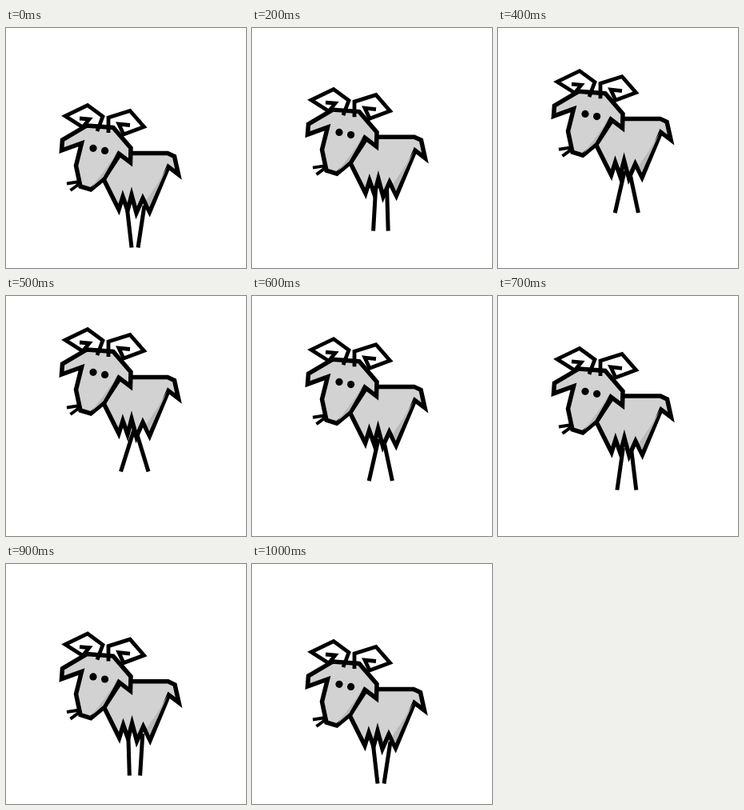
Animation of 300x300 px, one loop 1.5 s. Source, as an HTML page:

```html
<!DOCTYPE html>
<html lang="en">
<head>
<meta charset="utf-8">
<title>Jumping goat</title>
<style>
  html, body { margin: 0; width: 100%; height: 100%; overflow: hidden; background: #fff; }
  svg { display: block; width: 100vw; height: 100vh; }
  path { fill: none; stroke: #000; stroke-miterlimit: 10; }
  .coat { fill: #d2d2d2; stroke-width: 5.5; }
  .shade { fill: #b9b9b9; stroke: none; }
  .horn { stroke-width: 4.8; }
  .leg { stroke-width: 5; }
  .grass { stroke-width: 4; }
</style>
</head>
<body>
<svg viewBox="0 0 300 300">
  <g id="goat">
    <path id="legs" class="leg"/>
    <g id="body">
      <path class="coat" d="M157 156.5H202L210.5 160.5 215.5 183 203 173.5 179.5 230 171 213 163 231 157 209 152 228 146 211 141 227 122 189 141 160Z"/>
      <path class="shade" d="M201.5 174 Q190 195 175.5 215 L179 224Z"/>
    </g>
    <g id="head">
      <path class="coat" d="M101 122 134 124.5 156 150 155.5 168 141 157 123 188 106 202 93 198 87.5 172 94.5 144 69.5 153 70.5 140Z"/>
      <path class="shade" d="M139 156 Q123 179 107 199 L121.5 186.5Z"/>
      <path class="grass" d="M76 194.5 92 192M80.5 203 94 193"/>
      <path class="horn" d="M92 113 104 114 96 124 74 110 102 96.5 121 110.5 114 129"/>
      <path class="horn" d="M128 131V112L155 103.5 172.5 123.5 147 133 141 120 155 121.5"/>
      <circle cx="109" cy="150.3" r="4.6"/>
      <circle cx="123.6" cy="153.4" r="4.6"/>
    </g>
  </g>
</svg>
<script>
const $ = id => document.getElementById(id);
const LOOP = 1500, STEP = 100, TOP = 5, HEIGHT = 55;

const mix = (a, b, u) => a + (b - a) * u;
const move = (id, x, y) => $(id).setAttribute("transform", `translate(${x} ${y})`);

// One leg swings from its standing line to its line at the top of the jump
const leg = (hip, hipTop, foot, footTop, u) =>
  `M${mix(hip, hipTop, u)} 222L${mix(foot, footTop, u)} 274.5`;

function draw(now) {
  // Five steps up, five down, then a rest on the ground
  const i = Math.min(Math.floor(now % LOOP / STEP), 2 * TOP);
  const u = 1 - Math.abs(1 - i / TOP);
  const lag = Math.sin(Math.PI * u);

  move("goat", 0, -HEIGHT * u ** 1.06);
  move("head", 0, lag);
  move("body", lag, lag / 2);
  $("legs").setAttribute("d", leg(151, 160, 157, 143.5, u) + leg(173, 162, 165, 178, u));
}

const start = performance.now();
function tick() {
  draw(performance.now() - start);
  requestAnimationFrame(tick);
}
tick();
</script>
</body>
</html>
```
